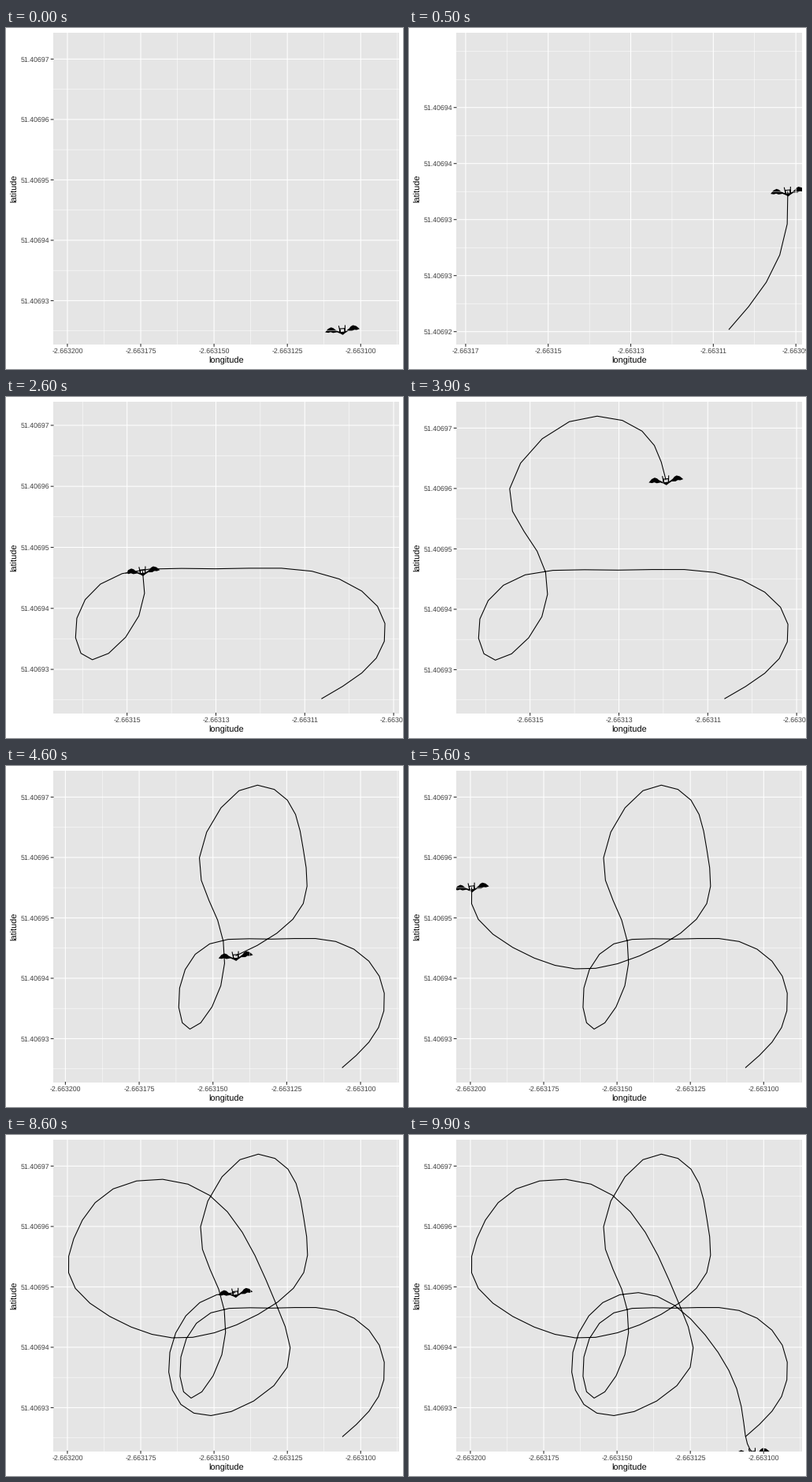
Animation of 504 by 432 pixels, one loop 10 s. Source, as a matplotlib script:

```python
import numpy as np
import matplotlib.pyplot as plt
from matplotlib.animation import FuncAnimation
from matplotlib.patches import Polygon, Rectangle

W, H, FRAMES = 504, 432, 100
L, R, T, B = 60, 498.5, 5.5, 400.5          # panel edges
X0, X1, Y0, Y1 = 79.9, 478.6, 23.5, 382.5   # data range in the full view
STEP = 3                                    # frames between key points

plt.rcParams["font.family"] = "Liberation Sans"
plt.rcParams["text.hinting"] = "none"

KEYS = np.array([
    (427, 382), (473, 331), (474, 266), (419, 222), (338, 219), (260, 225),
    (222, 281), (235, 333), (274, 278), (270, 195), (247, 116), (297, 31),
    (358, 43), (378, 105), (378, 174), (320, 227), (237, 256), (159, 243),
    (88, 194), (86, 131), (136, 68), (231, 62), (300, 123), (343, 214),
    (357, 294), (286, 350), (222, 341), (208, 275), (246, 212), (315, 204),
    (376, 253), (416, 321), (427, 380), (436, 402)], float)

# Right half of the bat; the left half mirrors it.
WING = np.array([(2, 2.5), (5, 1.5), (9, -1), (11, -3.2), (14, -4.5),
                 (18, -3), (22, 1), (18, 2), (15, 1.4), (12, 2.8),
                 (7, 2.4), (3, 4.5), (0, 6.5)])
EAR = np.array([(4, -5), (3, 3), (3, -1.5)])
TILT = -.1


def spline(keys, step):
    """Natural cubic spline, sampled once per frame."""
    n = len(keys)
    m = 4 * np.eye(n) + np.eye(n, k=1) + np.eye(n, k=-1)
    m[0], m[-1] = np.eye(n)[0], np.eye(n)[-1]
    bend = np.zeros_like(keys)
    bend[1:-1] = 6 * (keys[:-2] - 2 * keys[1:-1] + keys[2:])
    bend = np.linalg.solve(m, bend)
    t = np.arange((n - 1) * step + 1) / step
    k = np.minimum(t.astype(int), n - 2)
    u = (t - k)[:, None]
    v = 1 - u
    return (v * keys[k] + u * keys[k + 1]
            + ((v ** 3 - v) * bend[k] + (u ** 3 - u) * bend[k + 1]) / 6)


def mirror(half):
    """Join a half shape with its reflection, then tilt the whole."""
    p = np.vstack([half, half[::-1] * (-1, 1)])
    c, s = np.cos(TILT), np.sin(TILT)
    return p @ np.array([(c, s), (-s, c)])


def ease(i, start, length=6):
    t = min(max((i - start) / length, 0), 1)
    return 4 * t ** 3 if t < .5 else 1 - 4 * (1 - t) ** 3


def project(v, lo, hi, a, b):
    pad = .05 * (hi - lo)
    return a + (b - a) * (v - lo + pad) / (hi - lo + 2 * pad)


def grid(pos, values, lo, hi, margin=0):
    """Major values inside the panel, and the half steps around them."""
    step = values.step
    major = [v for v in values if lo + margin <= pos(v) <= hi]
    half = np.arange(major[0] - step, major[-1] + step + .1, step / 2)
    return major, [v for v in half if v not in major and lo <= pos(v) <= hi]


track = spline(KEYS, STEP) + (0, .3)
bat, ears = mirror(WING), mirror(EAR)
fig = plt.figure(figsize=(W / 72, H / 72), dpi=72, facecolor="white")
ax = fig.add_axes([0, 0, 1, 1])


def line(xs, ys, width, color, **kw):
    return ax.plot(xs, ys, lw=width, color=color, snap=False, **kw)[0]


def label(x, y, s, ha="center", size=8.8, color="#404040", **kw):
    ax.text(x, y, s, ha=ha, va="baseline", size=size, color=color, **kw)


def draw(i):
    ax.clear()
    ax.set(xlim=(0, W), ylim=(H, 0))
    ax.axis("off")
    panel = ax.add_patch(Rectangle((L, T), R - L, B - T, fc="#E5E5E5", lw=0))

    zoom_x = ease(i, 1) - ease(i, 41)
    zoom_y = ease(i, 1) - ease(i, 21)
    fine_x, fine_y = zoom_x > .51, zoom_y > .51

    def px(x):
        return project(x, X0 + 135.5 * zoom_x, X1, L, R)

    def py(y):
        return project(y, Y0 + 194.3 * zoom_y, Y1, T, B)

    # Longitude and latitude in millionths of a degree.
    def lon(v):
        return px(77.9 + (200 - v) * 3.724)

    def lat(v):
        return py(39.4 + (70 - v) * 7.65)

    xs, xm = grid(lon, range(90, 240, 20) if fine_x else range(75, 240, 25),
                  L, R)
    ys, ym = grid(lat, range(20, 90, 5 if fine_y else 10),
                  T, B, 50 if fine_y else 0)
    for width, vx, vy in ((.53, xm, ym), (1.07, xs, ys)):
        for v in vy:
            line([L, R], [lat(v)] * 2, width, "white")
        for v in vx:
            line([lon(v)] * 2, [T, B], width, "white")

    x, y = px(track[:i + 1, 0]), py(track[:i + 1, 1])
    here = x[-1], y[-1]
    shapes = [ax.add_patch(Polygon(bat + here, fc="black", lw=0)),
              line(*(ears + here).T, 1.1, "black")]
    if i:
        shapes.append(line(x, y, 1.07, "black", solid_capstyle="butt"))
    for s in shapes:
        s.set_clip_path(panel)

    for v in xs:
        line([lon(v)] * 2, [B, B + 2.75], 1.07, "#2B2B2B")
        text = f"-2.663{v:03d}"
        label(lon(v), 412, text[:-1] if fine_x else text)
    for v in ys:
        line([L - 2.75, L], [lat(v)] * 2, 1.07, "#2B2B2B")
        label(55, lat(v) + 3.15, f"51.4069{v // 10}", "right")
    label((L + R) / 2, 425, "longitude", size=11, color="black")
    label(14, (T + B) / 2, "latitude", size=11, color="black",
          rotation=90, rotation_mode="anchor")
    return []


anim = FuncAnimation(fig, draw, frames=FRAMES, init_func=lambda: [],
                     interval=100, repeat=True, repeat_delay=0)
plt.show()
```
